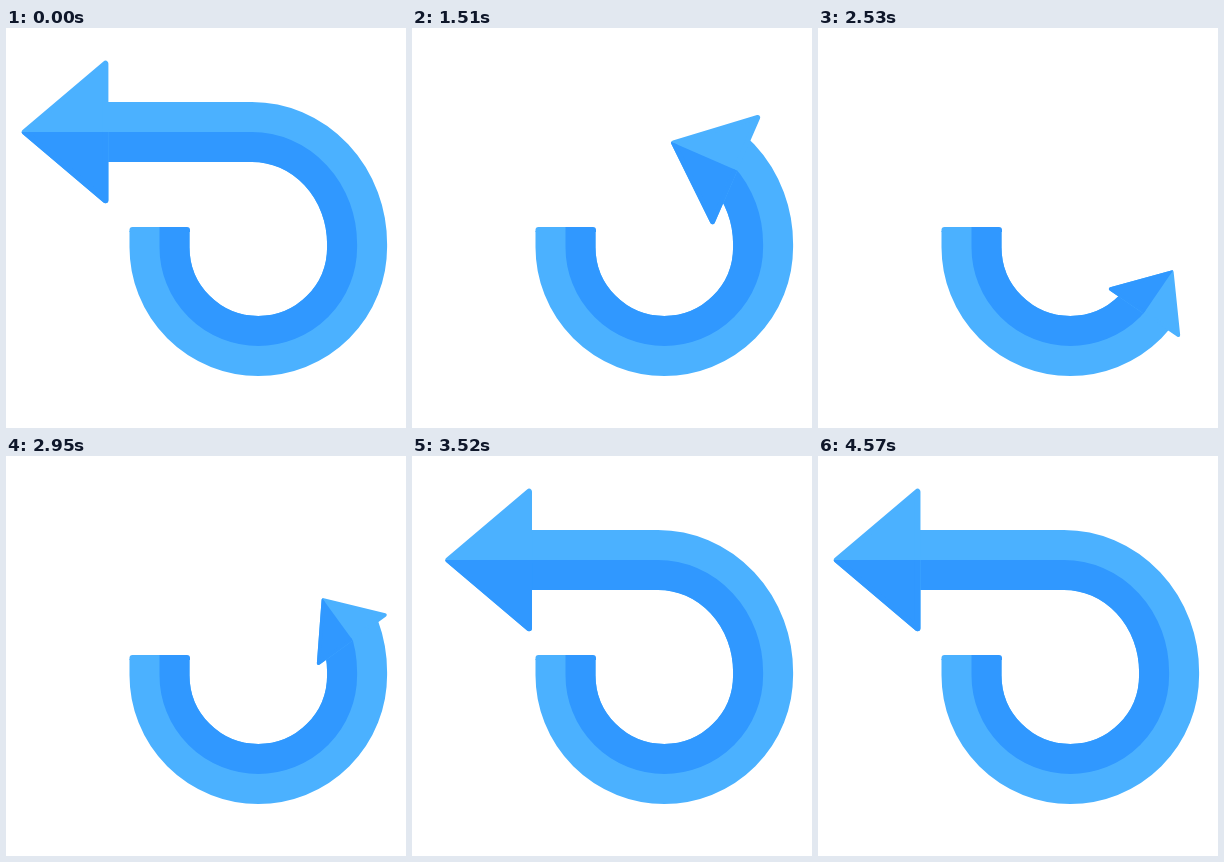
An HTML page that plays this animation: 400x400 px, repeating every 4630 ms.

```html
<!DOCTYPE html>
<html lang="en">
<head>
<meta charset="utf-8">
<title>Return arrow</title>
<style>
  html, body { margin: 0; height: 100%; overflow: hidden; background: #fff; }
  svg { display: block; width: 100vw; height: 100vh; }
  .light { fill: #4bb1ff; stroke: #4bb1ff; }
  .dark { fill: #3098ff; stroke: #3098ff; }
  .band { fill: none; stroke-width: 60; }
  .band.dark { stroke-width: 30; }
  .tail { stroke: none; }
  #head path { stroke-width: 6; stroke-linejoin: round; }
</style>
</head>
<body>
<svg viewBox="0 0 400 400">
  <defs>
    <path id="track" d="M153.5 203V219.2A98.8 98.8 0 0 0 351.1 219.2V216A105.1 112 0 0 0 246 104H60"/>
    <mask id="trim" maskUnits="userSpaceOnUse" x="0" y="0" width="400" height="400">
      <use id="visible" href="#track" fill="none" stroke="#fff" stroke-width="64"/>
    </mask>
    <clipPath id="half"><rect x="-100" width="110" height="90"/></clipPath>
    <path id="triangle" d="M-3 -68.3V68.3L-83.6 0Z"/>
  </defs>
  <g mask="url(#trim)">
    <use href="#track" class="band light"/>
    <path class="band dark" d="M168.5 203V219.2A83.8 83.8 0 0 0 336.1 219.2V216A90.1 97 0 0 0 246 119H60"/>
  </g>
  <path class="tail light" d="M123.5 204V202q0-3 3-3H154V204Z"/>
  <path class="tail dark" d="M153.5 204V199H181q3 0 3 3V204Z"/>
  <g id="head">
    <path class="light" d="M-3 -68.3V68.3L-83.6 0Z"/>
    <g clip-path="url(#half)"><path class="dark" d="M-3 -68.3V68.3L-83.6 0Z"/></g>
  </g>
</svg>
<script>
const LOOP = 4630;
const track = document.getElementById('track');
const visible = document.getElementById('visible');
const head = document.getElementById('head');
const restLength = track.getTotalLength() - 42.4;
const DEG = 180 / Math.PI;

// Ease with control points (x1, 0) and (x2, 1)
function ease(u, x1, x2) {
  let low = 0, high = 1;
  for (let i = 0; i < 24; i++) {
    const p = (low + high) / 2, q = 1 - p;
    if (3 * q * q * p * x1 + 3 * q * p * p * x2 + p * p * p < u) low = p;
    else high = p;
  }
  return low * low * (3 - 2 * low);
}

// Keys: [time, value, x1, x2], easing towards the next key
function sample(keys, t) {
  if (t <= keys[0][0]) return keys[0][1];
  for (let i = 1; i < keys.length; i++) {
    const [start, from, x1 = 1 / 3, x2 = 2 / 3] = keys[i - 1];
    const [end, to] = keys[i];
    if (t < end) return from + (to - from) * ease((t - start) / (end - start), x1, x2);
  }
  return keys[keys.length - 1][1];
}

const retraction = [
  [1000, 0, .26, .285], [2350, 398, .548, .535], [3800, -11], [4250, 3.3], [4600, 0]
];
const headScale = [[1310, 1], [1760, .6], [3050, .6], [3500, 1]];

function draw(t) {
  const s = sample(retraction, t);
  const length = restLength - s;
  const base = track.getPointAtLength(length);
  const behind = track.getPointAtLength(length - 1);
  const bend = Math.max(0, s - 191);
  const turn = .656 * bend * bend / (bend + 10);

  // The band reaches under the head as far as its tilted base needs
  const tangent = Math.atan2(behind.y - base.y, behind.x - base.x);
  const lead = Math.max(0, tangent - turn / DEG);
  const shown = length + 1 + 30 * Math.tan(lead);
  visible.setAttribute('stroke-dasharray', `${shown} 2000`);
  head.setAttribute('transform',
    `translate(${base.x} ${base.y}) rotate(${turn}) scale(${sample(headScale, t)})`);
}

const begin = performance.now();
function tick() {
  draw((performance.now() - begin) % LOOP);
  requestAnimationFrame(tick);
}
tick();
</script>
</body>
</html>
```
